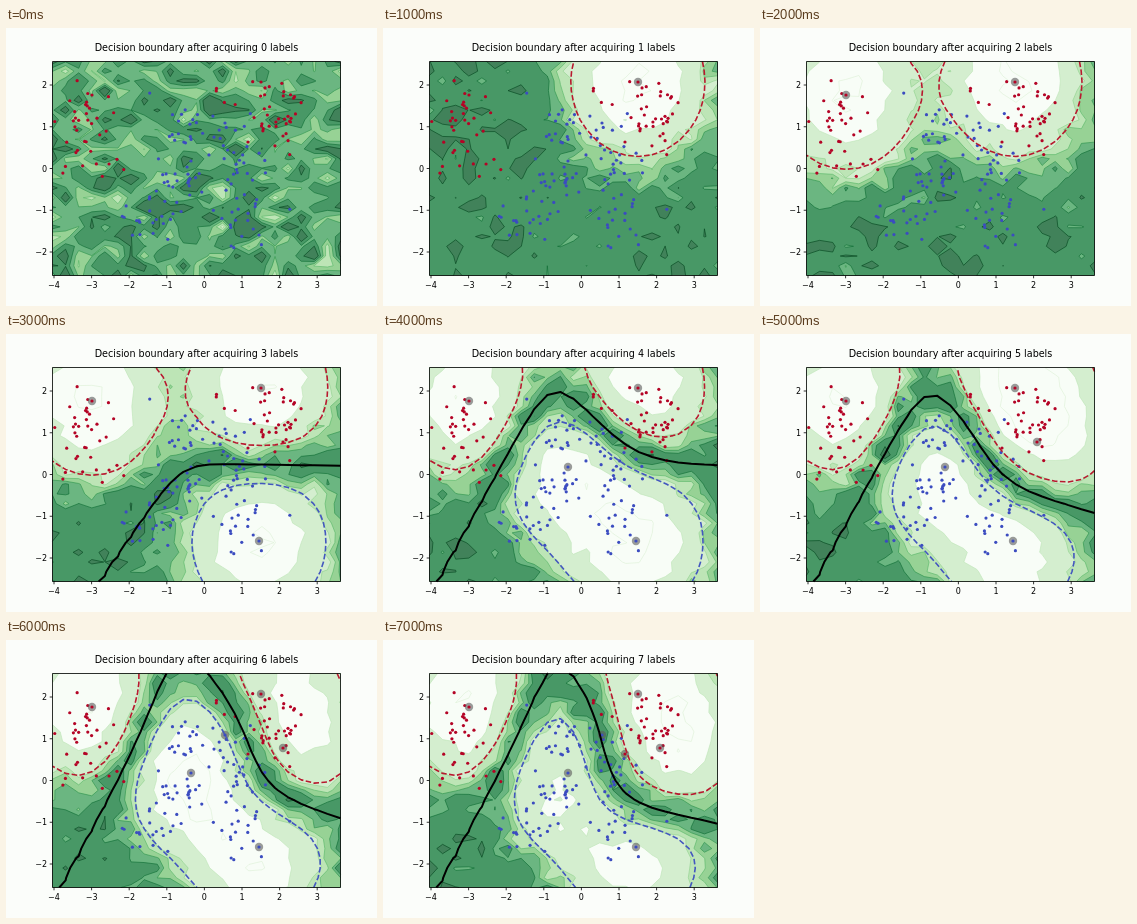
An HTML page with a canvas that plays this animation: 371x278 px, repeating every 8 s.

```html
<!DOCTYPE html>
<html lang="en">
<head>
<meta charset="utf-8">
<title>Decision boundary</title>
<style>
html, body { margin: 0; width: 100%; height: 100%; overflow: hidden; background: #fbfdfa; }
canvas { display: block; }
</style>
</head>
<body>
<canvas id="stage" width="371" height="278"></canvas>
<script>
const ctx = document.getElementById('stage').getContext('2d');
const box = { x: 46.5, y: 33.5, w: 288, h: 214 };
const unit = { x: 37.6, y: 41.75 }, origin = { x: 198.4, y: 140.5 };
const CELLS = 22, STEPS = 8, STEP_MS = 1000;
const RED = '#b40426', BLUE = '#3b4cc0';
const THRESHOLD = .282;

// Labels in order of acquisition: x, y, class
const labels = [
  [255, 54, 1], [86, 67, 1], [253, 207, -1], [185, 133, -1],
  [277, 108, 1], [219, 95, -1], [242, 114, 1]
];

// Clusters of data points: centre, spread, count, colour
const clusters = [
  [77, 88, 16, 17, 24, RED], [85, 130, 24, 14, 14, RED],
  [274, 92, 14, 17, 30, RED], [248, 72, 24, 22, 10, RED],
  [192, 96, 22, 13, 24, BLUE], [178, 150, 12, 13, 20, BLUE],
  [148, 184, 16, 16, 24, BLUE], [230, 185, 18, 19, 26, BLUE],
  [238, 128, 16, 17, 16, BLUE]
];

const levels = [-.04, .08, .14, .21, .29, .6, .95];
const fills = ['#41825a', '#489866', '#6bb681', '#97d295', '#bde5b6', '#d4eecf', '#f8fdf7', '#f8fdf7'];
const lines = ['#00441b', '#0b6b31', '#2a924a', '#56b567', '#8ed08b', '#bce4b5', '#dcf0d6'];

function seeded(seed) {
  return () => {
    seed = (seed * 48271) % 2147483647;
    return seed / 2147483647;
  };
}
const bell = rnd => (rnd() + rnd() + rnd() + rnd() - 2) * 1.73;

const scatter = seeded(71077);
const dots = clusters.flatMap(([x, y, sx, sy, count, color]) =>
  Array.from({ length: count }, () => [x + sx * bell(scatter), y + sy * bell(scatter), color]))
  .filter(([x, y]) => x > box.x && y > box.y);

// Kernel vote of the known labels, damped where both classes compete
function vote(known, x, y) {
  let red = 0, blue = 0;
  for (const [u, v, sign] of known) {
    const dx = (x - u) / unit.x, dy = (y - v) / unit.y;
    const weight = Math.exp(-.4 * (dx * dx + dy * dy));
    if (sign > 0) red += weight; else blue += weight;
  }
  return (red - blue) / (1 + 1.8 * Math.min(red, blue));
}

const gridX = i => box.x + box.w * i / CELLS;
const gridY = j => box.y + box.h * j / CELLS;

function sample(fn) {
  return Array.from({ length: CELLS + 1 }, (_, j) =>
    Array.from({ length: CELLS + 1 }, (_, i) => fn(gridX(i), gridY(j))));
}

// Marching squares: area above the level, and its border segments
function contour(grid, level) {
  const area = new Path2D(), segments = [];
  for (let j = 0; j < CELLS; j++) for (let i = 0; i < CELLS; i++) {
    const corners = [[i, j], [i + 1, j], [i + 1, j + 1], [i, j + 1]]
      .map(([a, b]) => [gridX(a), gridY(b), grid[b][a] - level]);
    const shape = [], cuts = [];
    corners.forEach((p, n) => {
      const q = corners[(n + 1) % 4];
      const inside = p[2] >= 0;
      if (inside) shape.push(p);
      if (inside !== (q[2] >= 0)) {
        const t = p[2] / (p[2] - q[2]);
        const cut = [p[0] + (q[0] - p[0]) * t, p[1] + (q[1] - p[1]) * t];
        shape.push(cut);
        cuts.push(cut);
      }
    });
    if (!shape.length) continue;
    shape.forEach(([x, y], n) => n ? area.lineTo(x, y) : area.moveTo(x, y));
    area.closePath();
    if (corners[0][2] < 0) cuts.push(cuts.shift());
    for (let n = 0; n + 1 < cuts.length; n += 2) segments.push([cuts[n], cuts[n + 1]]);
  }
  return { area, segments };
}

// Joins segments into continuous lines so that dashes run through
function joinSegments(segments) {
  const path = new Path2D(), open = segments.slice();
  const touch = (a, b) => Math.abs(a[0] - b[0]) + Math.abs(a[1] - b[1]) < .001;
  while (open.length) {
    const line = open.pop();
    for (let side = 0; side < 2; side++) {
      for (;;) {
        const end = line[line.length - 1];
        const at = open.findIndex(s => touch(s[0], end) || touch(s[1], end));
        if (at < 0) break;
        const [next] = open.splice(at, 1);
        line.push(touch(next[0], end) ? next[1] : next[0]);
      }
      line.reverse();
    }
    line.forEach(([x, y], n) => n ? path.lineTo(x, y) : path.moveTo(x, y));
  }
  return path;
}

function strokePath(path, color, width, dash = []) {
  ctx.strokeStyle = color;
  ctx.lineWidth = width;
  ctx.setLineDash(dash);
  ctx.stroke(path);
  ctx.setLineDash([]);
}

function disc(x, y, r, color) {
  ctx.fillStyle = color;
  ctx.beginPath();
  ctx.arc(x, y, r, 0, 7);
  ctx.fill();
}

// Without labels the field is pure noise on evenly spaced levels
function drawField(step, known) {
  const rnd = seeded(9173 + step * 7919);
  const certainty = sample((x, y) => step
    ? Math.abs(vote(known, x, y)) + .05 * bell(rnd)
    : .17 + .18 * bell(rnd));
  ctx.fillStyle = fills[0];
  ctx.fillRect(box.x, box.y, box.w, box.h);
  const bands = levels.map((level, n) => contour(certainty, step ? level : .15 * n));
  bands.forEach((band, n) => {
    ctx.fillStyle = fills[n + 1];
    ctx.fill(band.area);
  });
  bands.forEach((band, n) => strokePath(joinSegments(band.segments), lines[n], .6));
}

function drawAxes(step) {
  ctx.strokeStyle = ctx.fillStyle = '#000';
  ctx.lineWidth = .8;
  ctx.strokeRect(box.x, box.y, box.w, box.h);
  ctx.font = '8px "DejaVu Sans", sans-serif';
  const name = n => String(n).replace('-', '\u2212');
  ctx.beginPath();
  ctx.textAlign = 'center';
  for (let n = -4; n <= 3; n++) {
    const x = origin.x + unit.x * n;
    ctx.moveTo(x, box.y + box.h);
    ctx.lineTo(x, box.y + box.h + 2.8);
    ctx.fillText(name(n), x, 260);
  }
  ctx.textAlign = 'right';
  for (let n = -2; n <= 2; n++) {
    const y = origin.y - unit.y * n;
    ctx.moveTo(box.x, y);
    ctx.lineTo(box.x - 2.8, y);
    ctx.fillText(name(n), box.x - 5.4, y + 3);
  }
  ctx.stroke();
  ctx.textAlign = 'center';
  ctx.font = '9.6px "DejaVu Sans", sans-serif';
  ctx.fillText(`Decision boundary after acquiring ${step} labels`, 190.5, 23);
}

function draw(step) {
  const known = labels.slice(0, step);
  ctx.fillStyle = '#fbfdfa';
  ctx.fillRect(0, 0, 371, 278);
  ctx.lineJoin = 'round';
  drawField(step, known);
  dots.forEach(([x, y, color]) => disc(x, y, 1.6, color));
  known.forEach(([x, y]) => disc(x, y, 4.2, 'rgba(90,90,90,.6)'));
  labels.forEach(([x, y, sign]) => disc(x, y, 1.6, sign > 0 ? RED : BLUE));
  if (step > 0) {
    const grid = sample((x, y) => vote(known, x, y));
    const curve = level => joinSegments(contour(grid, level).segments);
    strokePath(curve(THRESHOLD), '#b8192f', 1.6, [5.6, 2.4]);
    strokePath(curve(-THRESHOLD), '#4357bf', 1.6, [5.6, 2.4]);
    if (known.some(label => label[2] < 0)) strokePath(curve(0), '#000', 2);
  }
  drawAxes(step);
}

let shown = -1;
function tick() {
  const step = Math.floor(performance.now() / STEP_MS) % STEPS;
  if (step !== shown) draw(shown = step);
  requestAnimationFrame(tick);
}
tick();
</script>
</body>
</html>
```
